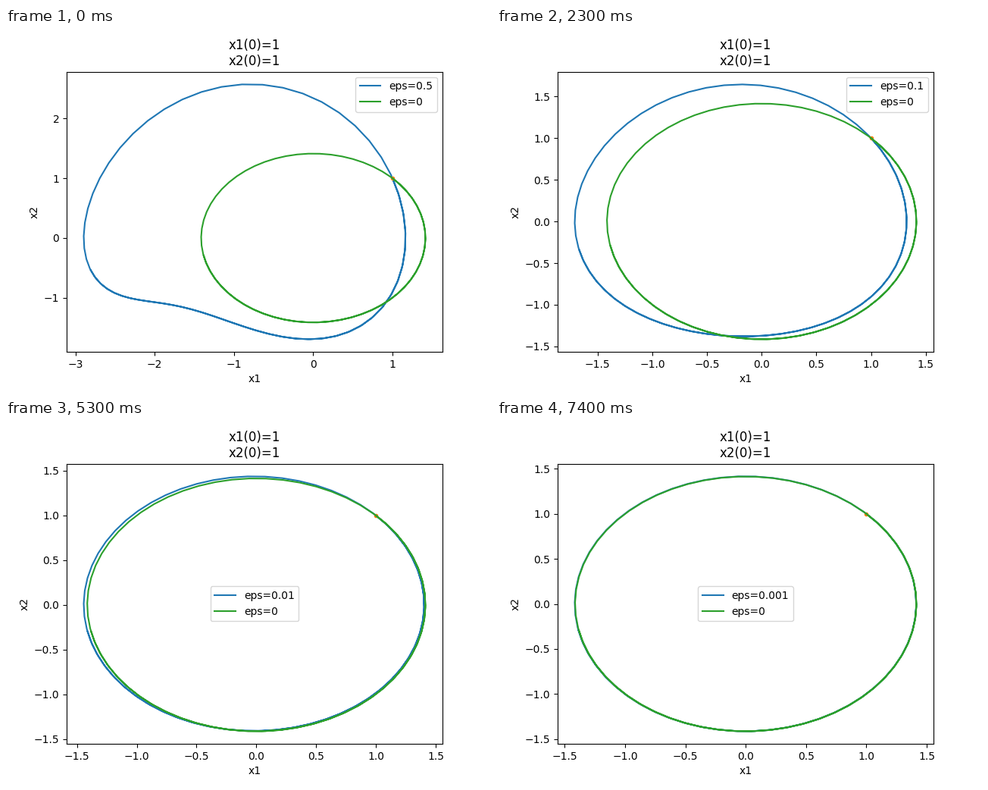
Write a matplotlib script that moves like this. It is 640 px wide and 480 px high and loops after 8 s.

```python
import numpy as np
import matplotlib.pyplot as plt
from matplotlib.animation import FuncAnimation

STEP = 500      # ms per frame
FRAMES = 16

# (first frame, eps, legend position)
STAGES = [
    (0, 0.5, "upper right"),
    (1, 0.1, "upper right"),
    (7, 0.01, "center"),
    (13, 0.001, "center"),
]

t = np.linspace(0, 10, 100)


def orbit(eps):
    """Phase curve of x'' + x = -4 eps cos(t)^2 with x(0) = x'(0) = 1."""
    x1 = np.cos(t) + np.sin(t) + eps * (4 * np.cos(t) + 2 * np.cos(2 * t) - 6) / 3
    x2 = np.cos(t) - np.sin(t) - eps * 4 * (np.sin(t) + np.sin(2 * t)) / 3
    return x1, x2


fig, ax = plt.subplots(figsize=(6.4, 4.8), dpi=100)


def draw(frame):
    _, eps, loc = [s for s in STAGES if s[0] <= frame][-1]
    ax.clear()
    ax.plot(*orbit(eps), color="C0", label=f"eps={eps}")
    ax.plot(1, 1, ".", color="C1", markersize=6)
    ax.plot(*orbit(0), color="C2", label="eps=0")
    ax.set_title("x1(0)=1\nx2(0)=1")
    ax.set_xlabel("x1")
    ax.set_ylabel("x2")
    ax.legend(loc=loc)
    return []


anim = FuncAnimation(fig, draw, frames=FRAMES, init_func=lambda: draw(0),
                     interval=STEP, repeat=True, repeat_delay=0, blit=False)
plt.show()
```
